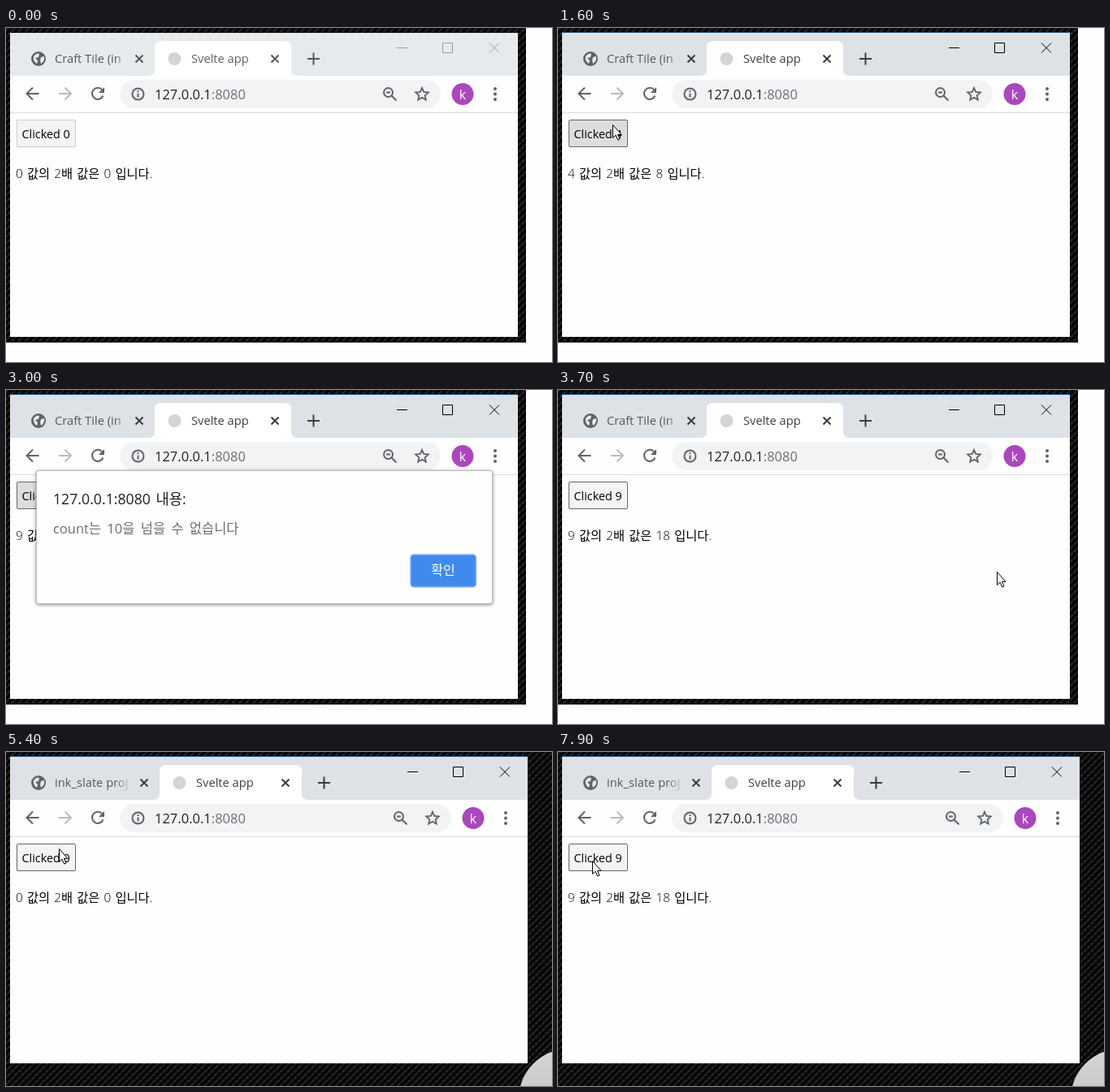
Write an HTML page that moves like this. It is 672 px wide and 412 px high and loops after 8000 ms.

```html
<!DOCTYPE html>
<html lang="ko">
<head>
<meta charset="utf-8">
<title>Svelte app</title>
<style>
html, body { margin: 0; width: 100%; height: 100%; overflow: hidden; background: #fefefe; }
svg { display: block; width: 672px; height: 412px; }
text { font: 14.7px "Open Sans", "Noto Sans CJK KR", "Noto Sans CJK", sans-serif; white-space: pre; }
.line { fill: none; stroke: #5f6368; stroke-width: 2; }
.thin { fill: none; stroke-width: 1; }
#dialog rect:first-child { filter: drop-shadow(0 1px 2px #0007); }
</style>
</head>
<body>
<svg viewBox="0 0 672 412">
  <defs>
    <pattern id="carbon" width="6" height="6" patternUnits="userSpaceOnUse" patternTransform="rotate(45)">
      <rect width="6" height="6" fill="#060606"/>
      <rect x="1" width="2" height="5" fill="#2a2a2a"/>
    </pattern>
    <linearGradient id="fade" gradientUnits="userSpaceOnUse" x1="134" x2="155" y1="0" y2="0">
      <stop stop-color="#54585d"/><stop offset="1" stop-color="#54585d" stop-opacity="0"/>
    </linearGradient>
    <linearGradient id="metal" x2="0" y2="1">
      <stop stop-color="#d6d6d6"/><stop offset=".6" stop-color="#c2c2c2"/>
    </linearGradient>
    <path id="x" d="M-4.5-4.5l9 9m0-9l-9 9"/>
  </defs>

  <rect id="wall" fill="url(#carbon)"/>
  <circle id="disc" cx="693" cy="428" r="62" fill="url(#metal)"/>
  <rect id="page" x="5" y="6" fill="#fefefe"/>
  <rect id="strip" x="5" y="6" height="53"/>
  <path id="edge" stroke="#22598a"/>
  <path id="tab" fill="#fff"/>
  <path id="rule" stroke="#dadce0"/>

  <circle cx="40" cy="38" r="9" fill="#5f6368"/>
  <path d="M34 35q4-5 7-3l-1 4-4 1 3 3-1 4q-5-3-4-9zM43 36l4-1q1 6-4 9l-1-4z" fill="#e7eaed"/>
  <text id="title" x="60" y="43" fill="url(#fade)"></text>
  <g id="marks" fill="none" stroke-width="2">
    <use href="#x" x="164" y="38" data-shift="6"/>
    <path d="M331 38m-4.500-4.500l9 9m0-9l-9 9M371 38h15m-7.500-7.500v15" data-shift="13"/>
  </g>
  <g data-shift="6">
    <circle cx="207.500" cy="38" r="8" fill="#d4d4d4"/>
    <text id="app" x="228" y="43">Svelte app</text>
  </g>
  <path id="controls" class="thin" data-shift="13" d="M481 24.500h13M537.500 18.500h12v12h-12zM595 18.500l12 12m0-12l-12 12"/>

  <path class="line" d="M40.500 81H25.500m7.500-7.500L25.500 81l7.500 7.500"/>
  <path class="line" style="stroke:#babcbe" d="M65 81h15m-7.500-7.500L80 81l-7.500 7.500"/>
  <path class="line" d="M118.500 76.500a7 7 0 1 0 1 7"/>
  <path d="M121 73v7h-7z" fill="#5f6368"/>
  <rect id="pill" x="140" y="64" height="35" rx="17.500" fill="#f1f3f4"/>
  <circle class="line" cx="162.500" cy="81.500" r="7"/>
  <path class="line" d="M162.500 80.500v5m0-8.500v2"/>
  <text x="183" y="87.500" style="font-size:16.5px" fill="#202124">127.0.0.1<tspan fill="#6c7075">:8080</tspan></text>
  <g data-shift="13">
    <circle class="line" cx="470.500" cy="79.500" r="5.500"/>
    <path class="line" d="M474.500 83.500l6 6M468 79.500h5"/>
    <path id="star" class="line" style="stroke-width:1.8"/>
    <circle cx="562" cy="81.500" r="13.500" fill="#ab47bc"/>
    <text x="562" y="87.500" text-anchor="middle" style="font-size:16px" fill="#fff">k</text>
    <g fill="#5f6368"><circle cx="602" cy="75" r="2"/><circle cx="602" cy="81.500" r="2"/><circle cx="602" cy="88" r="2"/></g>
  </g>

  <rect id="button" x="13.500" y="113.500" width="72" height="33" rx="1.500"/>
  <text id="label" x="19.500" y="136" style="font-size:14.4px"></text>
  <text id="result" x="12" y="185" style="font-size:15.3px;font-weight:300;word-spacing:1.2px" fill="#000"></text>

  <g id="dialog">
    <rect x="37.500" y="99.500" width="561" height="164" rx="2.500" fill="#fefefe" stroke="#bcbcbc"/>
    <text x="58" y="141" style="font-size:17.7px;word-spacing:2px" fill="#202124">127.0.0.1:8080 내용:</text>
    <text x="58" y="177" style="font-size:16.5px;word-spacing:3px" fill="#6a6d71">count는 10을 넘을 수 없습니다</text>
    <rect x="498" y="203" width="80.500" height="40" rx="4" fill="#4289ee" stroke="#8ab6f6" stroke-width="1.500"/>
    <text x="538" y="228" text-anchor="middle" style="font-size:16px" fill="#fff">확인</text>
  </g>
  <path id="cursor" d="M.5.5V16.500l3.600-3.300 2.600 5.900 2.300-1-2.500-5.700H11z" fill="#fff" stroke="#000"/>
</svg>
<script>
const $ = id => document.getElementById(id);
const set = (id, attrs) => { for (const k in attrs) $(id).setAttribute(k, attrs[k]); };
const show = (id, on) => { $(id).style.display = on ? '' : 'none'; };

const star = Array.from({ length: 10 }, (_, i) => {
  const a = i * Math.PI / 5, r = i % 2 ? 3.8 : 8.2;
  return (512 + r * Math.sin(a)).toFixed(1) + ' ' + (82 - r * Math.cos(a)).toFixed(1);
});
set('star', { d: 'M' + star.join('L') + 'Z' });

// Cursor stops: tick, x, y (no x: hidden)
const stops = [
  [0], [1, 470, 73], [2, 267, 115], [3, 80, 151], [4, 97, 121], [6, 63, 121], [7, 67, 119],
  [27, 170, 144], [28, 400, 190], [29, 628, 216], [30],
  [35, 598, 230], [36, 540, 224], [38, 546, 218], [43],
  [45, 520, 95], [46, 252, 125], [47, 75, 150], [49, 70, 138], [50, 68, 128], [51, 65, 119],
  [73, 64, 121], [76, 58, 125], [77, 51, 130], [78, 45, 133], [79, 42, 134]
];

// Each click takes 1/0.7 ticks; the button is down for the first half.
function clicks(n, start, max) {
  const c = Math.max(0, (n - start) * .7 + 1e-6);
  return { count: Math.min(max, Math.floor(c)), down: n >= start && c < max + .5 && c % 1 < .5 };
}

function layout(second, active) {
  const right = second ? 642 : 630, bottom = second ? 384 : 381;
  const l = second ? 189 : 183, r = second ? 364 : 351;
  set('wall', second ? { width: 672, height: 412 } : { width: 640, height: 388 });
  show('disc', second);
  set('page', { width: right - 5, height: bottom - 6 });
  set('strip', { width: right - 5, fill: active ? '#dee1e6' : '#e7eaed' });
  set('edge', { d: `M5 5.5H${right}` });
  show('edge', active);
  set('tab', { d: `M${l - 8} 59q8 0 8-8V24q0-8 8-8H${r - 8}q8 0 8 8V51q0 8 8 8z` });
  set('rule', { d: `M5 104.5H${right}` });
  set('pill', { width: second ? 408 : 395 });
  set('controls', { stroke: active ? '#000' : '#999' });
  set('marks', { stroke: active ? '#3a3d41' : '#54585d' });
  set('app', { fill: active ? '#3c4043' : '#5f6368' });
  $('title').textContent = second ? 'ink_slate proj' : 'Craft Tile (in';
  for (const g of document.querySelectorAll('[data-shift]'))
    g.setAttribute('transform', `translate(${second ? g.dataset.shift : 0})`);
}

function draw(n) {
  const second = n >= 43;
  layout(second, second ? n >= 52 : n >= 9);

  let { count, down } = second ? clicks(n, 53, 8) : clicks(n, 10, 9);
  const open = n >= 25 && n < 37;
  if (open || n === 74) down = true;
  if (n >= 75) count = 9;
  const focus = second ? n >= 53 : n >= 10;
  set('button', { fill: down ? '#ddd' : '#f4f4f4', stroke: focus ? '#666' : '#ccc' });
  $('label').textContent = `Clicked ${count}`;
  $('result').textContent = `${count} 값의 2배 값은 ${count * 2} 입니다.`;

  show('dialog', open);
  set('dialog', { transform: `translate(0 ${n === 25 ? -20 : 0})`, opacity: n === 25 ? .7 : 1 });

  const [, x, y] = stops.findLast(s => s[0] <= n);
  show('cursor', x !== undefined);
  if (x !== undefined) set('cursor', { transform: `translate(${x} ${y})` });
}

let last = -1;
function tick() {
  const n = Math.floor(performance.now() % 8000 / 100);
  if (n !== last) draw(last = n);
  requestAnimationFrame(tick);
}
tick();
</script>
</body>
</html>
```
